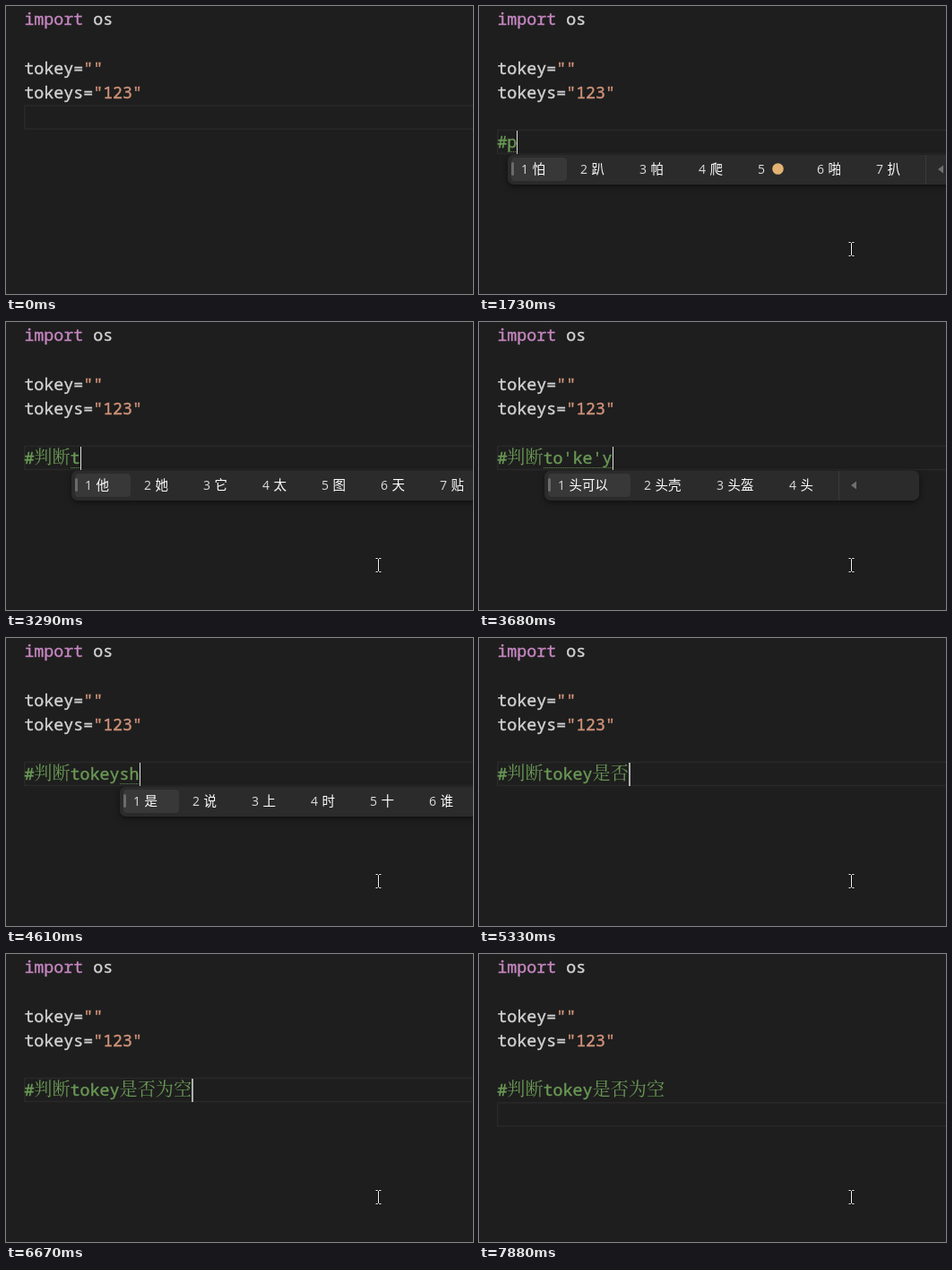
An HTML page for the animation above (8000 ms loop, 521 px wide and 321 px high).

```html
<!DOCTYPE html>
<html lang="zh">
<head>
<meta charset="utf-8">
<title>Typing a comment</title>
<style>
  html, body { margin: 0; width: 100%; height: 100%; overflow: hidden; background: #1e1e1e; }
  svg { display: block; width: 521px; height: 321px; }
  text { white-space: pre; }
  .code { font: 18.3px "Noto Sans Mono", monospace; color: #d4d4d4; }
  .code text, .code tspan { fill: currentColor; stroke: currentColor; stroke-width: .4px; }
  .code .han { font: 200 20.15px "Noto Serif CJK SC", "Noto Sans CJK SC", "Noto Sans CJK", sans-serif; stroke: none; }
  .keyword { color: #c586c0; }
  .string { color: #ce9178; }
  .comment { color: #6a9955; }
  .digit { font: 14px "Open Sans", sans-serif; fill: #dcdcdc; }
  .word { font: 500 14.5px "Noto Sans CJK SC", "Noto Sans CJK", sans-serif; fill: #fff; }
  .popup { filter: drop-shadow(0 2px 3px rgba(0, 0, 0, .5)); }
</style>
</head>
<body>
<svg viewBox="0 0 521 321">
  <rect width="521" height="321" fill="#1e1e1e"/>
  <rect id="active" x="20.75" width="510" height="26" fill="none" stroke="#292929" stroke-width="1.5"/>
  <g class="code">
    <text x="20.4" y="21"><tspan class="keyword">import</tspan> os</text>
    <text x="20.4" y="75.8">tokey=<tspan class="string">""</tspan></text>
    <text x="20.4" y="103">tokeys=<tspan class="string">"123"</tspan></text>
    <text id="comment" class="comment" x="20.4" y="158"></text>
  </g>
  <line id="underline" y1="162.5" y2="162.5" stroke="#6a9955" stroke-dasharray="1 1"/>
  <rect id="caret" height="26"/>
  <g id="popup"></g>
  <g id="mouse" fill="none">
    <path d="M-3-7h2l1 1 1-1h2M0-6v13M-3 8h2l1-1 1 1h2" stroke="#111" stroke-width="2.6"/>
    <path d="M-3-7h2l1 1 1-1h2M0-6v13M-3 8h2l1-1 1 1h2" stroke="#f4f4f4"/>
  </g>
</svg>
<script>
const LOOP = 8000, BLINK = 530, LEFT = 20, POPUP_MAX_X = 128;
const LATIN = 10.98, HAN = 20.15;
const PAN = "判断 盘断 盘端 盼 判";
const TOKEY = "头可以 头壳 头盔 头";
const SHIFOU = "是否 师否 是 时 事";

// time, editor row, committed text, text being composed, candidates
const steps = [
  [-650, 4, "", "", ""],
  [1140, 5, "", "", ""],
  [1400, 5, "#", "", ""],
  [1730, 5, "#", "p", "怕 趴 帕 爬 ● 啪 扒"],
  [1800, 5, "#", "pa", "怕 趴 帕 爬 ● 啪 扒"],
  [1860, 5, "#", "pan", "盘 判 盼 攀 叛 畔 磐"],
  [1930, 5, "#", "pan'd", "判断 判定 盘点 盘 判"],
  [2070, 5, "#", "pan'du", "判断 判读 盘 判 盼"],
  [2140, 5, "#", "pan'dua", PAN],
  [2200, 5, "#", "pan'duan", PAN],
  [2340, 5, "#判断", "", ""],
  [3220, 5, "#判断", "t", ""],
  [3290, 5, "#判断", "t", "他 她 它 太 图 天 贴"],
  [3350, 5, "#判断", "to", "头 投 透 偷 痛 同 通"],
  [3420, 5, "#判断", "to'k", "痛苦 头盔 偷看 头 投"],
  [3550, 5, "#判断", "to'ke", "头可 头壳 偷渴 头 投"],
  [3680, 5, "#判断", "to'ke'y", TOKEY],
  [3940, 5, "#判断tokey", "", ""],
  [4540, 5, "#判断tokey", "s", "是 所 上 说 三 四 算"],
  [4610, 5, "#判断tokey", "sh", "是 说 上 时 十 谁 啥"],
  [4680, 5, "#判断tokey", "shi", "是 时 事 十 使 市 试"],
  [4810, 5, "#判断tokey", "shi'f", "是否 释放 师傅 是 时"],
  [4870, 5, "#判断tokey", "shi'fo", SHIFOU],
  [5000, 5, "#判断tokey", "shi'fou", SHIFOU],
  [5330, 5, "#判断tokey是否", "", ""],
  [5470, 5, "#判断tokey是否", "w", ""],
  [5540, 5, "#判断tokey是否", "w", "我 为 无 问 五 万 玩"],
  [5610, 5, "#判断tokey是否", "we", "为 位 未 喂 问 文 温"],
  [5680, 5, "#判断tokey是否", "wei", "为 位 未 喂 围 微 维"],
  [5880, 5, "#判断tokey是否为", "", ""],
  [6010, 5, "#判断tokey是否为", "k", ""],
  [6080, 5, "#判断tokey是否为", "k", "看 可 快 开 空 卡 哭"],
  [6150, 5, "#判断tokey是否为", "ko", "空 口 扣 控 孔 恐 抠"],
  [6210, 5, "#判断tokey是否为", "kon", "空 控 孔 恐 倥 崆 箜"],
  [6340, 5, "#判断tokey是否为", "kong", "空 控 孔 恐 倥 崆 箜"],
  [6670, 5, "#判断tokey是否为空", "", ""],
  [7150, 5, "#判断tokey是否为空 ", "", ""],
  [7350, 6, "#判断tokey是否为空 ", "", ""]
];
const mouseTimes = [70, 140, 200, 270, 340, 410, 480];

const $ = id => document.getElementById(id);
const set = (id, attrs) => {
  for (const key in attrs) $(id).setAttribute(key, attrs[key]);
};
const advance = text => [...text].reduce((sum, c) => sum + (c > "\u2fff" ? HAN : LATIN), 0);
const rowTop = row => 0.7 + 27.4 * row;
const markHan = text => text.replace(/[\u3000-\u9fff]+/g, '<tspan class="han">$&</tspan>');

function popupMarkup(x, words) {
  let left = x + 4, items = "";
  words.forEach((word, i) => {
    const width = 47 + 15 * word.length;
    if (i === 0) {
      items += `<rect x="${left}" y="169" width="${width}" height="26" rx="4" fill="#383838"/>
        <rect x="${left}" y="174" width="3" height="15" rx="1.5" fill="#6b6b6b"/>`;
    }
    items += `<text class="digit" x="${left + 11}" y="187">${i + 1}</text>`;
    items += word === "●"
      ? `<circle cx="${left + 33.5}" cy="181.5" r="6.3" fill="#e3b273"/>`
      : `<text class="word" x="${left + 23.5}" y="187.3">${word}</text>`;
    left += width + 4;
  });
  return `<rect class="popup" x="${x}" y="165.5" width="${left - x + 90}" height="33.5" rx="7" fill="#2b2b2b"/>
    ${items}<path d="M${left + .5} 166v33" stroke="#3a3a3a"/>
    <path d="M${left + 20} 177.5v9l-6-4.5z" fill="#6f6f6f"/>`;
}

let shown = null;
function showStep(step) {
  const [, row, done, typing, words] = step;
  const start = advance(done), end = start + advance(typing);
  const caretAt = row === 5 && end ? Math.round(end + (typing ? .4 : .6)) : 0;
  $("comment").innerHTML = markHan(done + typing);
  set("active", { y: rowTop(row) + .75 });
  set("caret", {
    x: LEFT + caretAt,
    y: Math.round(rowTop(row) + .8),
    width: typing ? 1 : 2,
    fill: typing ? "#e0e0e0" : "#aeafad"
  });
  set("underline", { x1: LEFT + start + 1, x2: LEFT + end + 1, opacity: typing ? 1 : 0 });
  const popupX = Math.min(Math.round(LEFT + start + 1.24), POPUP_MAX_X);
  $("popup").innerHTML = words ? popupMarkup(popupX, words.split(" ")) : "";
}

function render(t) {
  const step = steps.filter(s => s[0] <= t).pop();
  if (step !== shown) showStep(shown = step);

  const caretOn = step[3] || (t - step[0]) % (2 * BLINK) < BLINK;
  set("caret", { opacity: caretOn ? 1 : 0 });

  const moves = mouseTimes.filter(time => time <= t).length;
  const away = (1 - (moves - 1) / (mouseTimes.length - 1)) ** 2;
  set("mouse", {
    opacity: moves ? 1 : 0,
    transform: `translate(${Math.round(415 + 36 * away) + .5} ${Math.round(271 + 35 * away) - .5})`
  });
}

const startTime = performance.now();
function tick() {
  render((performance.now() - startTime) % LOOP);
  requestAnimationFrame(tick);
}
tick();
</script>
</body>
</html>
```
